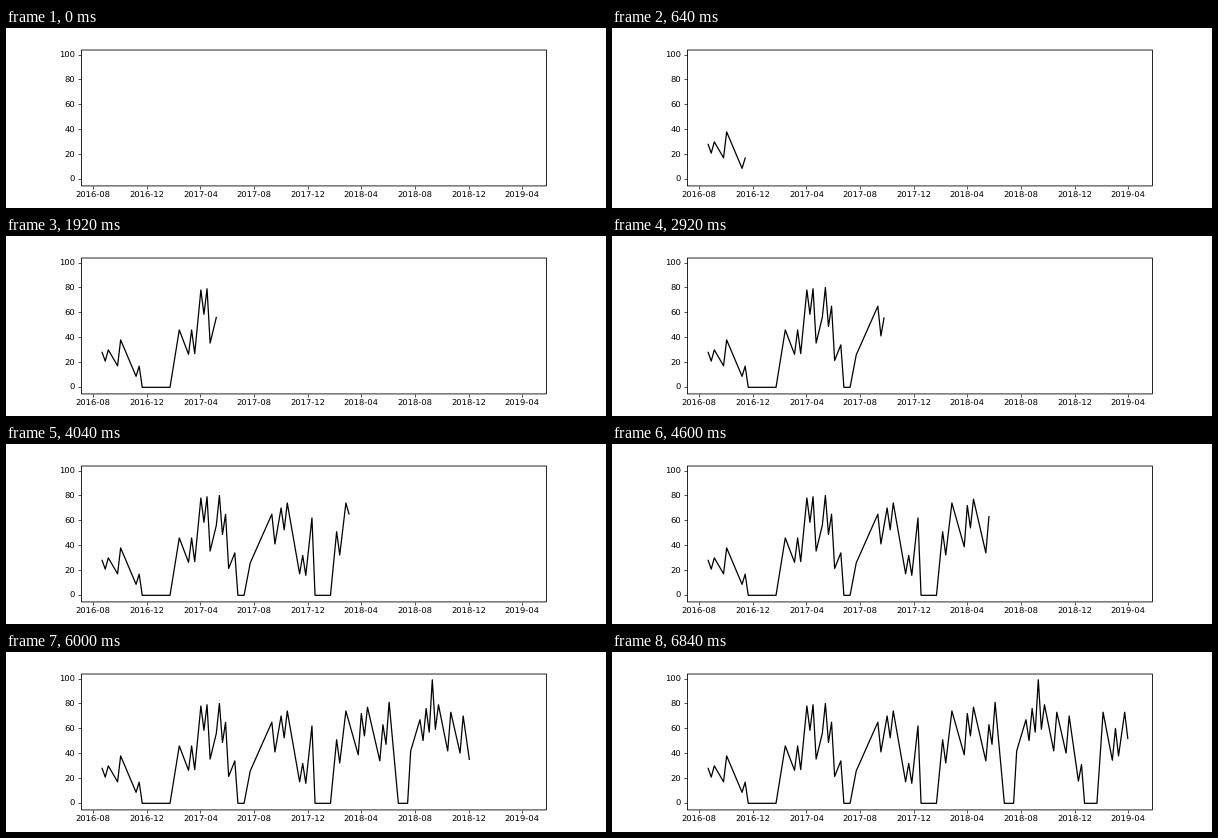
Recreate the animation shown at these times as a matplotlib script. Size 600 px wide and 180 px high, loop 6920 ms.

```python
import numpy as np
import matplotlib.pyplot as plt
import matplotlib.dates as mdates
from matplotlib.animation import FuncAnimation
from matplotlib.patches import Rectangle
from matplotlib.transforms import ScaledTranslation

TICK_MS = 40    # display tick
TICKS = 173     # one loop
WEEKS = 137
PAPER = "#fefefe"

# key weeks and their height, and the quiet spans between the seasons
PEAKS = {
    0: 28, 2: 30, 6: 38, 12: 17,
    25: 46, 29: 46, 30: 27, 32: 78, 34: 79, 37: 56, 38: 80, 40: 65, 43: 34,
    48: 26, 55: 65, 58: 70, 60: 74, 65: 32, 66: 16, 68: 62,
    76: 51, 79: 74, 84: 72, 86: 77, 91: 63, 93: 81,
    100: 42, 103: 67, 105: 76, 107: 99, 109: 79, 113: 73, 117: 70, 121: 31,
    128: 73, 132: 60, 135: 73, 136: 52,
}
BREAKS = [(13, 22), (45, 46), (70, 74), (97, 99), (123, 126)]


def add_dips(knots):
    """Put a dip between neighbouring peaks, deeper the further apart they are."""
    out = dict(knots)
    weeks = sorted(knots)
    for a, b in zip(weeks, weeks[1:]):
        gap = b - a
        climbing = knots[b] > 1.5 * knots[a]
        if gap > 1 and not climbing:
            week = a + 1 if gap < 4 else b - 1
            out[week] = (0.4 + 0.7 / gap) * min(knots[a], knots[b])
    return out


def weekly_values():
    rests = {week: 0 for span in BREAKS for week in span}
    knots = add_dips({**PEAKS, **rests})
    xs = sorted(knots)
    return np.interp(np.arange(WEEKS), xs, [knots[x] for x in xs])


def padded(low, high, margin=0.05):
    pad = margin * (high - low)
    return low - pad, high + pad


plt.rcParams["text.hinting"] = "none"
values = weekly_values()
days = mdates.date2num(np.datetime64("2016-08-21")) + 7 * np.arange(WEEKS)

fig, ax = plt.subplots(figsize=(10, 3), dpi=60, facecolor=PAPER)
fig.subplots_adjust(left=0.125, right=0.9, bottom=0.125, top=0.88)
ax.set_facecolor(PAPER)
ax.set_xlim(padded(days[0], days[-1] + 7))
ax.set_ylim(padded(0, values.max()))
ax.set_yticks(range(0, 101, 20))
ax.xaxis.set_major_locator(mdates.MonthLocator(bymonth=(4, 8, 12)))
ax.xaxis.set_major_formatter(mdates.DateFormatter("%Y-%m"))

# soft frame, a fraction of a pixel right and down
ax.spines[:].set_visible(False)
nudge = ScaledTranslation(0.42 / 60, -0.42 / 60, fig.dpi_scale_trans)
ax.add_artist(Rectangle((0, 0), 1, 1, fill=False, ec="black", lw=1, snap=False,
                        clip_on=False, transform=ax.transAxes + nudge))
line, = ax.plot([], [], color="black", lw=1.5)


def update(tick):
    # a new week every 50 ms, rounded to the display tick
    shown = (4 * tick + 1) // 5
    line.set_data(days[:shown], values[:shown])
    return line,


anim = FuncAnimation(fig, update, frames=TICKS, interval=TICK_MS,
                     init_func=lambda: update(0), repeat=True, repeat_delay=0)
plt.show()
```
